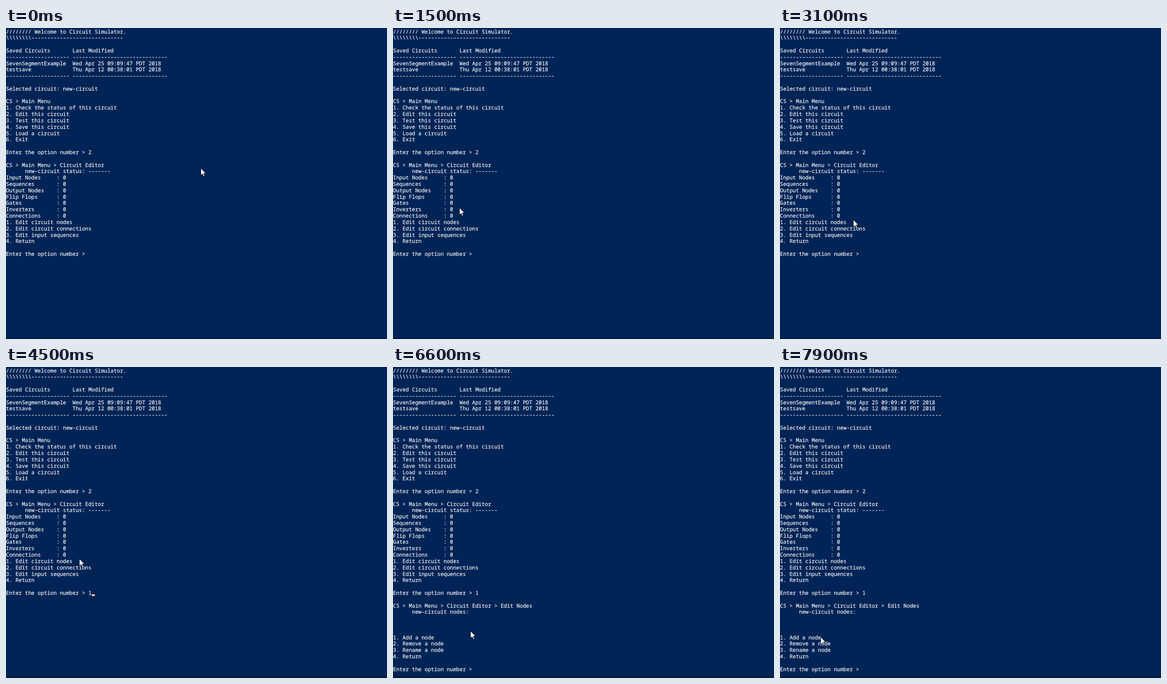
Animation, 828 px wide and 676 px high, one loop 8000 ms. Source, as an HTML page:

```html
<!DOCTYPE html>
<html lang="en">
<head>
<meta charset="utf-8">
<title>Circuit Simulator</title>
<style>
  html, body { margin: 0; width: 100%; height: 100%; overflow: hidden; background: #012456; }
  body { position: relative; }
  pre {
    position: absolute; left: 0; top: 1.5px; margin: 0;
    font: 11.487px/13.81px "Noto Sans Mono", "DejaVu Sans Mono", monospace;
    font-variant-ligatures: none;
    text-rendering: geometricPrecision;
    color: #eeedf0;
    -webkit-text-stroke: .25px #eeedf0;
  }
  #edge { position: absolute; left: 0; right: 0; top: 673px; bottom: 0; background: #011a40; }
  #caret, #mouse { position: absolute; left: 0; top: 0; }
  #caret { width: 8px; height: 4px; background: #fedba9; transform-origin: 0 0; }
  #mouse { overflow: visible; }
</style>
</head>
<body>
<pre>//////// Welcome to Circuit Simulator.
\\\\\\\\-----------------------------

Saved Circuits       Last Modified
-------------------- ------------------------------
SevenSegmentExample  Wed Apr 25 09:09:47 PDT 2018
testsave             Thu Apr 12 00:38:01 PDT 2018
-------------------- ------------------------------

Selected circuit: new-circuit

CS &gt; Main Menu
1. Check the status of this circuit
2. Edit this circuit
3. Test this circuit
4. Save this circuit
5. Load a circuit
6. Exit

Enter the option number &gt; 2

CS &gt; Main Menu &gt; Circuit Editor
      new-circuit status: -------
Input Nodes     : 0
Sequences       : 0
Output Nodes    : 0
Flip Flops      : 0
Gates           : 0
Inverters       : 0
Connections     : 0
1. Edit circuit nodes
2. Edit circuit connections
3. Edit input sequences
4. Return

Enter the option number &gt; <span id="typed">1</span>
<span id="submenu">
CS &gt; Main Menu &gt; Circuit Editor &gt; Edit Nodes
      new-circuit nodes:



1. Add a node
2. Remove a node
3. Rename a node
4. Return

Enter the option number &gt; </span></pre>
<div id="edge"></div>
<div id="caret"></div>
<svg id="mouse" width="12" height="19">
  <path d="M.5 1V16.2L4 12.9L6.5 18.4L8.9 17.4L6.5 12H11.2Z" fill="#fff" stroke="#000" stroke-width=".8"/>
</svg>
<script>
  const LOOP = 8000, TICK = 100, BLINK = 500, SCALE = .8616;
  const CARET_START = 4100, TYPED = 4500, ENTERED = 5100;
  const START = [423, 304];
  // begin, end, x, y, sideways bend
  const moves = [
    [0, 500, 280, 421], [600, 800, 217, 383], [900, 1500, 144, 390],
    [1500, 2000, 154, 326, -10], [2000, 2400, 170, 375], [2500, 3100, 159, 416, -16],
    [6300, 6600, 168, 573, -28], [6600, 6900, 98, 586],
    [7000, 7200, 82, 592], [7300, 7900, 88, 586]
  ];
  const [typed, submenu, caret, mouse] =
    ["typed", "submenu", "caret", "mouse"].map(id => document.getElementById(id));

  const show = (el, on) => el.style.visibility = on ? "visible" : "hidden";
  const place = (el, x, y, scale = 1) =>
    el.style.transform = `translate(${x}px, ${y}px) scale(${scale})`;

  function pointerAt(t) {
    let [x, y] = START;
    for (const [begin, end, toX, toY, bend = 0] of moves) {
      if (t <= begin) break;
      const k = 1 - (1 - Math.min(1, (t - begin) / (end - begin))) ** 2;
      const dx = toX - x, dy = toY - y;
      const side = bend * Math.sin(Math.PI * k) / Math.hypot(dx, dy);
      x += dx * k - dy * side;
      y += dy * k + dx * side;
    }
    return [Math.round(x), Math.round(y)];
  }

  function draw(now) {
    const t = Math.floor(now % LOOP / TICK) * TICK;
    place(mouse, ...pointerAt(t));
    show(typed, t >= TYPED);
    show(submenu, t >= ENTERED);
    const age = t - CARET_START;
    show(caret, age >= 0 && Math.floor(age / BLINK) % 2 === 0);
    const column = t >= TYPED && t < ENTERED ? 27 : 26;
    place(caret, column * 8 * SCALE, t < ENTERED ? 494.2 : 659.4, SCALE);
    requestAnimationFrame(draw);
  }
  draw(0);
</script>
</body>
</html>
```
